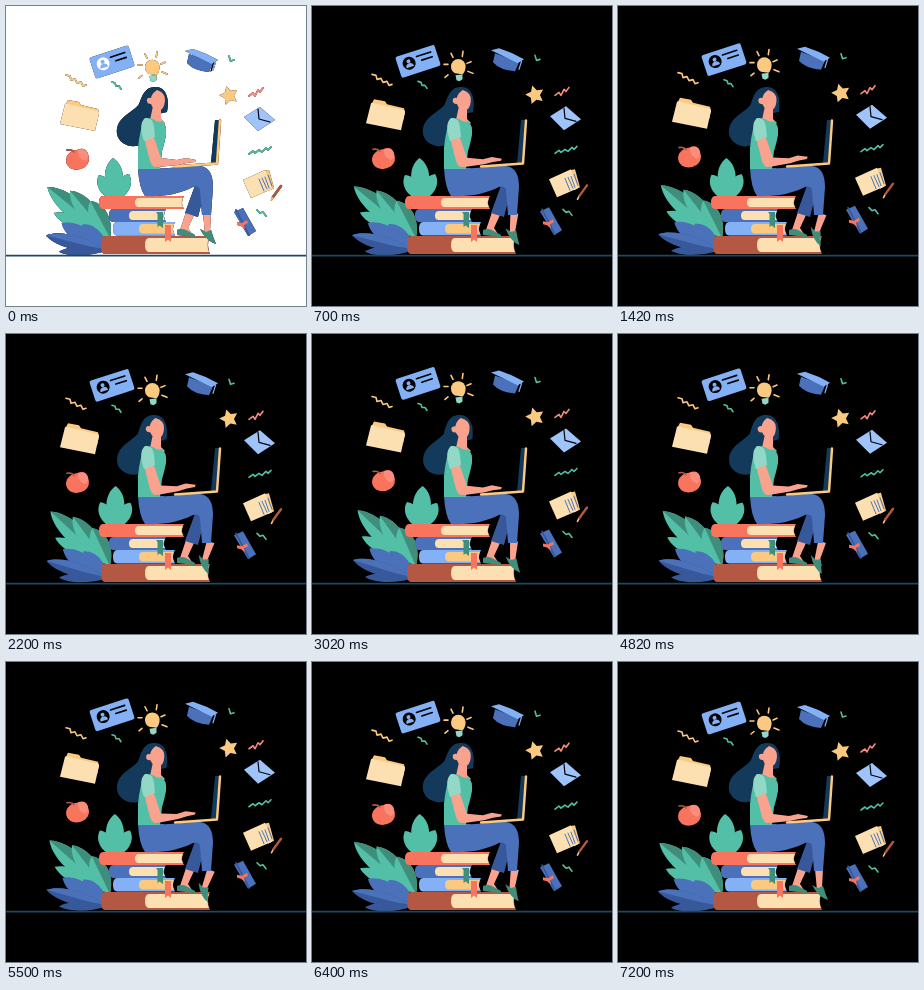
Write an HTML page that moves like this. It is 300 px wide and 300 px high and loops after 7220 ms.

```html
<!DOCTYPE html>
<html lang="en">
<head>
<meta charset="utf-8">
<title>Studying</title>
<style>
:root {
  --bg: #000; --blue: #4a71b9; --deep: #37589a; --sky: #84b1f6; --pale: #9fc3fb; --navy: #143a5b;
  --teal: #52bfa6; --pine: #3f8e7b; --mint: #93d8c6; --coral: #f8745d; --rust: #b45843;
  --cream: #fde0b1; --gold: #fbc97f; --skin: #f9a38f;
}
:root.flash { --bg: #fff; }
.flash .edge { filter: drop-shadow(0 0 .4px #000); }
html, body { margin: 0; height: 100%; overflow: hidden; background: var(--bg); }
svg { display: block; width: 100vw; height: 100vh; }
.line { fill: none; stroke-width: 1.6; stroke-linejoin: round; stroke-linecap: round; }
</style>
</head>
<body>
<svg viewBox="0 0 300 300">
  <g class="edge">
    <g id="sprout"></g>
    <g id="fern"></g>
    <g id="shrub"></g>
    <g id="books"></g>
    <path d="M150 206h7v16l-3.500-2.500l-2 1.500v-13z" fill="var(--pine)"/>
    <path d="M159 219h6v17l-3-2.500l-3 2.500z" fill="var(--coral)"/>

    <!-- legs -->
    <path d="M180 206l8 3-6 13 4 6-12-4z" fill="var(--skin)"/>
    <path d="M171 224q5-2 9 0l9 5v2l-18-2z" fill="var(--pine)"/>
    <path d="M191 174l8 10-7 27-13-4z" fill="var(--deep)"/>
    <g id="foot">
      <path d="M197 207h8l-1 19 3 7-8-5z" fill="var(--skin)"/>
      <path d="M194 223l6 3 5-2q2 7 5 14-10-3-16-15z" fill="var(--pine)"/>
    </g>
    <path d="M132 162h23c12 1 26-3 39-2 10 1 13 10 13 21l-2 28h-9l-2-25q-1-5-7-3c-14 7-30 10-48 9q-6-8-7-28z" fill="var(--blue)"/>

    <!-- head and body -->
    <path id="hair" d="M140 90l-7 8c-6 9-24 13-22 30 2 11 17 16 26 9l12-16 3-15z" fill="var(--navy)"/>
    <g id="head">
      <path d="M150 81c-11-1-14 9-17 17l3 8 16 2 9-2c3-13-1-25-11-25z" fill="var(--navy)"/>
      <path d="M151 84q9 3 8 11-1 9-6 9-6 0-8-6-5 0-4-5 2-2 4-1 1-5 6-8z" fill="var(--skin)"/>
    </g>
    <path d="M147 100h8v13l4 4-7 5-8-8z" fill="var(--skin)"/>
    <path d="M139 112l8 1q5 4 9 2 5 4 4 14-2 10-4 16l-2 18h-22v-21q2-20 7-30z" fill="var(--teal)"/>

    <!-- laptop and arm -->
    <path d="M205 157l4-43h4l-3 44z" fill="var(--navy)"/>
    <path class="line" d="M169 160.500l42-3 3-43" stroke="var(--gold)" style="stroke-width:2.500"/>
    <g id="arm" fill="var(--skin)">
      <path d="M146 153l9-1 16 2 9-2 10 2-1 2-8 1-9 2-20 2q-6-1-6-8z"/>
    </g>
    <path d="M138 131l9-2 8 23q0 8-5 9-4 0-6-6z" fill="var(--skin)"/>
    <path d="M139 112q8-1 9 9l1 10-11 4q-6-17 1-23z" fill="var(--mint)"/>

    <!-- floating things -->
    <g id="float">
      <g transform="translate(106 49) rotate(-18)">
        <rect x="-20.500" y="-11" width="41" height="22" rx="2" fill="var(--sky)"/>
        <circle cx="-9" cy="-1" r="6.500" fill="var(--bg)"/>
        <circle cx="-9" cy="-3" r="2" fill="var(--sky)"/>
        <path d="M-13 3q0-4 4-4t4 4z" fill="var(--sky)"/>
        <path class="line" d="M0-5H15M4 0H15" stroke="#000"/>
      </g>

      <path d="M143 61q-4-2-4-7a7.300 7.300 0 0 1 14.600 0q0 5-3 8z" fill="var(--gold)"/>
      <path d="M143.500 63l7-1v5l-3 2-3-1z" fill="var(--mint)"/>
      <path class="line" d="M139 41l2 4M151 39l-.7 5M155 51l4-1.700M156 59l5 2M132 52h4M133 65l3-2.500" stroke="var(--gold)"/>

      <path d="M183 41l-2 9q7 8 22 9l4-9z" fill="var(--blue)"/>
      <path d="M179 38l8-2q13 4 25 11l-6 4z" fill="var(--sky)"/>
      <path class="line" d="M207.500 50l-2.500 8" stroke="#000" style="stroke-width:1"/>
      <path class="line" d="M209.500 49l-2.500 8" stroke="var(--sky)" style="stroke-width:1.200"/>

      <path id="star" fill="var(--gold)"/>
      <path d="M238 104l16-10 15 13-17 11z" fill="var(--pale)"/>
      <path class="line" d="M252 96l1 10 11 3" stroke="#000" style="stroke-width:1.200"/>

      <path d="M60 91l2-4 11 2 2 3 17 4 1 4-2 9z" fill="var(--gold)"/>
      <path d="M59 91q1-1 3 0l30 7q1 1 1 2l-4 18-35-7z" fill="var(--cream)"/>

      <path d="M71 137q8-4 11 4t-3 13q-8 5-15 1-6-5-3-12 4-6 10-6z" fill="var(--coral)"/>
      <path d="M72 137q9-3 10 5 0 5-3 6-8-3-7-11z" fill="#fa8d7c"/>
      <path class="line" d="M61 137q5-1 7 2" stroke="var(--rust)"/>

      <path d="M258 158l5-1 5 18-6 3z" fill="var(--gold)"/>
      <path d="M237 167l22-10 7 19-21 9z" fill="var(--cream)"/>
      <path class="line" d="M253 166l5 12M256 165l5 11M259 164l4 11M262 162l4 11" stroke="var(--blue)" style="stroke-width:1"/>
      <path class="line" d="M275 173l-8 11" stroke="var(--rust)" style="stroke-width:2.400"/>
      <path class="line" d="M266.500 185l-1 2" stroke="var(--gold)"/>

      <path d="M228 199l9-4 13 23-8 5z" fill="var(--blue)"/>
      <path class="line" d="M230 197l13 25" stroke="var(--deep)"/>
      <path d="M231 209l5 1 5-3 1 3-4 2 1 4-4-3-4-1z" fill="var(--coral)"/>

      <g class="line">
        <path d="M60 62l4 1 1 4 4-1 2 4 4-1 2 4 3-1" stroke="var(--gold)"/>
        <g stroke="var(--teal)">
          <path d="M106 69l3 1 1 3 3 0 2 3M223 43l1.500 5 3.500-1"/>
          <path d="M243 141l4-3 2 2 4-3 3 2 4-4 2 2 3-3M251 197l3 3 3-1 3 4"/>
        </g>
        <path d="M243 83l4-3 2 3 3-6 2 2 3-4" stroke="#f98a7f"/>
      </g>
    </g>
  </g>
  <path d="M0 249.700H300" stroke="#1b4a60" stroke-width="1.800"/>
</svg>
<script>
const LOOP = 7220;
const $ = id => document.getElementById(id);
const path = (d, color) => `<path d="${d}" fill="var(--${color})"/>`;

// A leaf grows from (x, y); the angle is clockwise from upright, each half has its colour.
function leaf(x, y, angle, length, width, left, right = left) {
  const side = w => `C${w} ${-length * .35} ${w} ${-length * .8} 0 ${-length}`;
  const back = `C${width} ${-length * .8} ${width} ${-length * .35} 0 0`;
  return `<g transform="translate(${x} ${y}) rotate(${angle})">` +
    path(`M0 0${side(-width)}${back}`, left) +
    (right === left ? '' : path(`M0 0V${-length}${back}`, right)) + '</g>';
}

const book = (x, y, right, height, page, cover, paper) =>
  path(`M${x + 4} ${y}H${right}q-4 ${height / 2} 0 ${height}H${x + 4}q-4 0-4 ${-height / 2}t4 ${-height / 2}z`, cover) +
  path(`M${page + 4} ${y + 2}H${right - 1}q-3 ${height / 2 - 2} 0 ${height - 4}H${page + 4}` +
       `q-4 0-4 ${2 - height / 2}t4 ${2 - height / 2}z`, paper);

$('sprout').innerHTML =
  leaf(108, 195, -28, 30, 9, 'teal') +
  leaf(110, 195, 28, 30, 9, 'teal') +
  leaf(109, 195, 0, 43, 12, 'teal');
$('fern').innerHTML =
  leaf(102, 230, -66, 59, 9, 'teal') +
  leaf(102, 230, -50, 78, 13, 'teal', 'pine') +
  leaf(102, 230, -39, 59, 12, 'teal', 'pine') +
  leaf(104, 232, -27, 42, 12, 'teal', 'pine');
$('shrub').innerHTML =
  leaf(102, 245, -43, 37, 10, 'blue') +
  leaf(102, 245, -58, 54, 11, 'blue') +
  leaf(102, 245, -75, 64, 9, 'deep', 'blue') +
  leaf(102, 244, -91, 49, 6, 'deep');
$('books').innerHTML =
  book(95, 230, 204, 18, 139, 'rust', 'cream') +
  book(107, 216, 169, 13.5, 133, 'sky', 'gold') +
  book(103, 203, 160, 13, 123, 'blue', 'cream') +
  book(93, 190, 178, 13, 129, 'coral', 'cream');

let star = '';
for (let i = 0; i < 10; i++) {
  const a = i * Math.PI / 5 - 1.85, r = i % 2 ? 5 : 9.8;
  star += `${i ? 'L' : 'M'}${223 + r * Math.cos(a)} ${82.5 + r * Math.sin(a)}`;
}
$('star').setAttribute('d', star + 'z');

const turn = (id, angle, x, y) =>
  $(id).setAttribute('transform', `rotate(${angle} ${x} ${y})`);
// Eases from 0 to 1 and back, the given number of times per loop.
const swing = (t, times) => (1 - Math.cos(2 * Math.PI * times * t / LOOP)) / 2;
const start = performance.now();

function draw() {
  const t = (performance.now() - start) % LOOP;
  const slow = swing(t, 1), fast = swing(t, 2);
  document.documentElement.classList.toggle('flash', t < 20);
  $('float').setAttribute('transform', `translate(0 ${7 * (1 - slow)})`);
  turn('sprout', 5 * slow - 2.5, 109, 195);
  turn('fern', 5 * slow - 1, 102, 230);
  turn('shrub', 3.5 * slow - 1, 102, 245);
  turn('hair', -1.5 * slow, 150, 112);
  turn('head', -5 * slow, 150, 112);
  turn('arm', -5 * fast, 149, 156);
  turn('foot', 22 * fast, 200, 218);
  requestAnimationFrame(draw);
}
draw();
</script>
</body>
</html>
```
